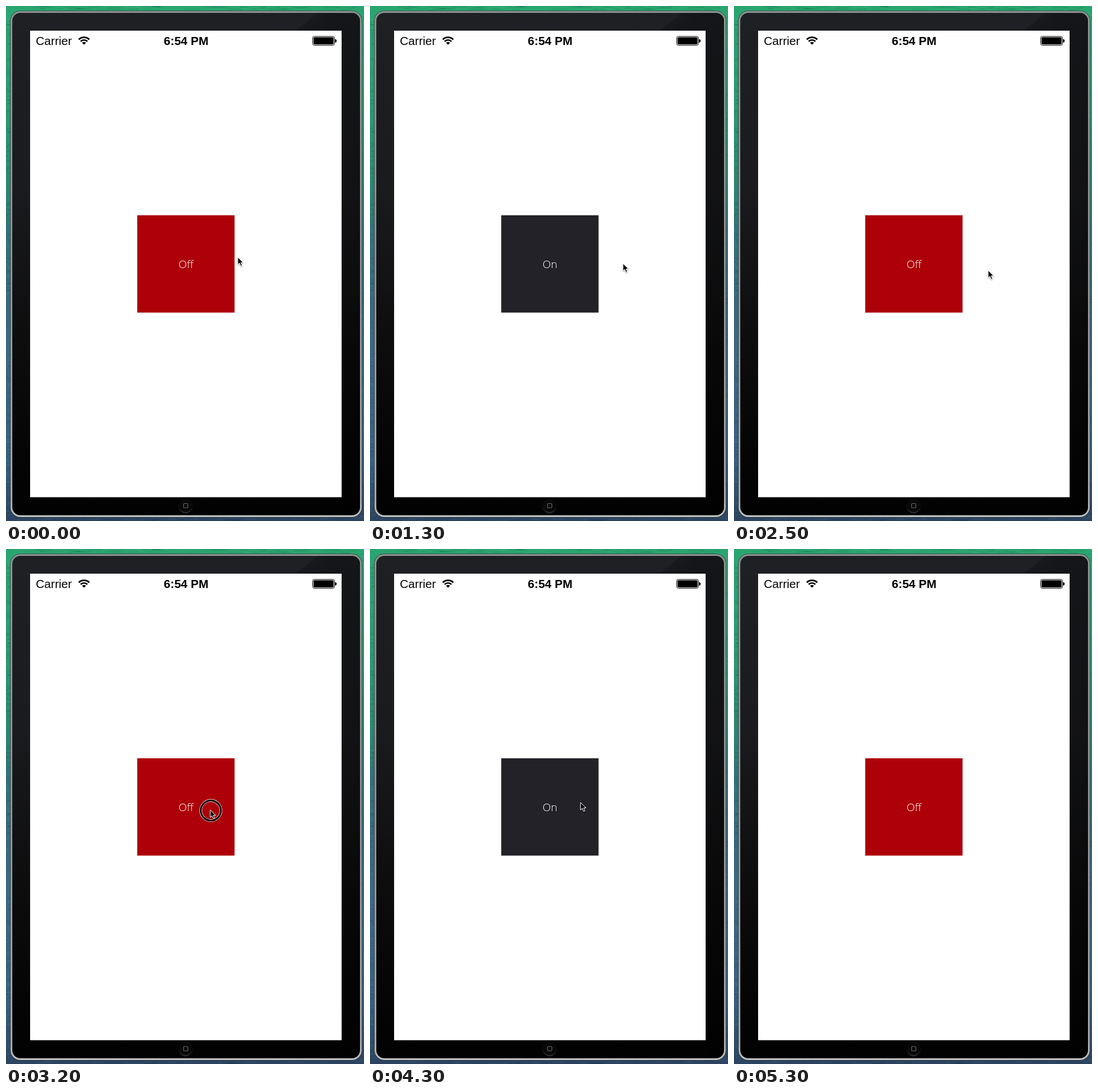
An HTML page with a canvas that plays this animation: 624x898 px, repeating every 6000 ms.

```html
<!DOCTYPE html>
<html lang="en">
<head>
<meta charset="utf-8">
<title>Toggle button</title>
<style>
  html, body { margin: 0; width: 100%; height: 100%; overflow: hidden; background: #28966f; }
  canvas, svg { position: absolute; left: 0; top: 0; width: 624px; height: 898px; display: block; }
  .status { font: 20.6px "Liberation Sans", Arial, sans-serif; }
  .clock { font-weight: 700; text-anchor: middle; }
  .label { font: 300 19px "Open Sans", "Liberation Sans", sans-serif; fill: #fff; text-anchor: middle; }
</style>
</head>
<body>
<canvas id="wall" width="624" height="898"></canvas>
<svg viewBox="0 0 624 898">
  <defs>
    <linearGradient id="rim" x1="0" y1="0" x2="0" y2="1">
      <stop offset="0" stop-color="#8f9292"/>
      <stop offset=".5" stop-color="#8f8f8f"/>
      <stop offset=".97" stop-color="#a8a8a8"/>
      <stop offset="1" stop-color="#c4c4c4"/>
    </linearGradient>
    <linearGradient id="body" x1="0" y1="0" x2="0" y2="1">
      <stop offset="0" stop-color="#1e2024"/>
      <stop offset=".35" stop-color="#1a1b1e"/>
      <stop offset=".65" stop-color="#0d0d0e"/>
      <stop offset=".9" stop-color="#040404"/>
      <stop offset="1" stop-color="#020202"/>
    </linearGradient>
    <linearGradient id="shade" x1="500" y1="0" x2="560" y2="40" gradientUnits="userSpaceOnUse">
      <stop offset="0" stop-color="#000" stop-opacity=".08"/>
      <stop offset="1" stop-color="#000" stop-opacity=".32"/>
    </linearGradient>
    <linearGradient id="home" x1="0" y1="0" x2="0" y2="1">
      <stop offset="0" stop-color="#050505"/>
      <stop offset=".6" stop-color="#0e0e0e"/>
      <stop offset="1" stop-color="#333"/>
    </linearGradient>
    <filter id="drop" x="-50%" y="-50%" width="200%" height="200%">
      <feDropShadow dx="0" dy="1.2" stdDeviation="1.1" flood-opacity=".45"/>
    </filter>
  </defs>

  <!-- device -->
  <rect x="7" y="8" width="614" height="884" rx="18" fill="#30383a" fill-opacity=".7"/>
  <rect x="8" y="9" width="612" height="882" rx="17" fill="url(#rim)"/>
  <rect x="11" y="12" width="606" height="876" rx="14" fill="url(#body)"/>
  <path d="M543 12H603a14 14 0 0 1 14 14V874a14 14 0 0 1-14 14H585V43H505Z" fill="url(#shade)"/>
  <circle cx="313" cy="872" r="12.5" fill="url(#home)"/>
  <circle cx="313" cy="870.5" r="11.8" fill="#080808"/>
  <rect x="309.5" y="867.5" width="7.5" height="7.5" rx="1.6" fill="none" stroke="#6a6a6a" stroke-width="1.2"/>
  <rect x="42" y="43" width="543" height="813.5" fill="#fff"/>

  <!-- status bar -->
  <text class="status" x="52" y="68">Carrier</text>
  <g transform="translate(136 67.5)" fill="none" stroke="#000" stroke-width="2.7">
    <path d="M-9.1-9A12.8 12.8 0 0 1 9.1-9"/>
    <path d="M-5.9-5.8A8.3 8.3 0 0 1 5.9-5.8"/>
    <path d="M0 0L-3.4-3.4A4.8 4.8 0 0 1 3.4-3.4Z" fill="#000" stroke="none"/>
  </g>
  <text class="status clock" x="314" y="68">6:54 PM</text>
  <rect x="534.5" y="53" width="38" height="15.5" rx="3" fill="none" stroke="#000"/>
  <rect x="536" y="54.5" width="35" height="12.5" rx="1.8"/>
  <path d="M574 58a3 3 0 0 1 0 5.6Z" stroke="#000"/>

  <!-- button -->
  <rect id="button" x="228.7" y="364.9" width="169.7" height="169.7"/>
  <text id="label" class="label" x="313.6" y="457"></text>

  <!-- pointer -->
  <g id="pointer">
    <g id="ring" fill="none" transform="translate(1 1)">
      <circle r="17.5" stroke="#fff" stroke-opacity=".8" stroke-width="4.8"/>
      <circle r="17.5" stroke="#000" stroke-width="3"/>
    </g>
    <path d="M0 0V13L3 10.2 5.3 15.4 7.6 14.4 5.4 9.4H9.4Z" stroke="#fff" stroke-width="1" filter="url(#drop)"/>
  </g>
</svg>
<script>
const LOOP = 6000, STEP = 100;
const $ = id => document.getElementById(id);

// time, x, y of the pointer tip
const path = [
  [0, 404, 438], [500, 357, 444], [800, 357, 444],
  [1300, 441, 449], [1400, 441, 449], [2000, 357, 452], [2200, 357, 452],
  [2500, 443, 461], [2800, 446, 462], [3100, 356, 455], [3300, 356, 455],
  [3700, 452, 450], [3900, 452, 450], [4300, 367, 442], [4600, 367, 442],
  [5300, 600, -30]
];
const presses = [[600, 800], [2000, 2200], [3100, 3300], [4400, 4500]];
const lerp = (a, b, k) => a + (b - a) * k;

function tipAt(t) {
  const i = path.findIndex(p => p[0] > t);
  if (i < 0) return null;
  const [t0, x0, y0] = path[i - 1], [t1, x1, y1] = path[i];
  const u = (t - t0) / (t1 - t0), k = u * u * (3 - 2 * u);
  return [lerp(x0, x1, k), lerp(y0, y1, k)];
}

function drawWall() {
  const g = $('wall').getContext('2d');
  const sky = g.createLinearGradient(0, 0, 0, 898);
  [[0, '#29a56f'], [.22, '#28996f'], [.34, '#2a8872'], [.44, '#30747a'], [.55, '#356a7e'],
   [.7, '#396788'], [.88, '#365f85'], [1, '#2b4360']].forEach(s => sky.addColorStop(...s));
  g.fillStyle = sky;
  g.fillRect(0, 0, 624, 898);
  let seed = 7;
  const rnd = () => (seed = seed * 16807 % 2147483647) / 2147483647;
  const streak = (x, y, w) => {
    g.strokeStyle = rnd() < .55 ? 'rgba(0,30,40,.12)' : 'rgba(150,230,210,.07)';
    g.lineWidth = .6 + rnd();
    g.beginPath();
    g.moveTo(x, y);
    g.lineTo(x + w, y + (rnd() - .5) * 3);
    g.stroke();
  };
  for (let i = 0; i < 330; i++) streak(rnd() * 6 - 3, rnd() * 898, 3 + rnd() * 7);
  for (let i = 0; i < 120; i++) streak(617 + rnd() * 4, rnd() * 898, 5);
  for (let i = 0; i < 90; i++) streak(rnd() * 624, rnd() * 8, 8 + rnd() * 20);
  for (let i = 0; i < 60; i++) streak(rnd() * 624, 892 + rnd() * 6, 8 + rnd() * 20);
}

function render(t) {
  const on = presses.filter(p => t >= p[1]).length % 2 === 1;
  $('button').setAttribute('fill', on ? '#232228' : '#ad0009');
  $('label').textContent = on ? 'On' : 'Off';
  const tip = tipAt(t);
  $('pointer').style.display = tip ? '' : 'none';
  if (tip) $('pointer').setAttribute('transform', `translate(${tip})`);
  const pressed = presses.some(([a, b]) => t >= a && t < b);
  $('ring').style.display = pressed ? '' : 'none';
}

drawWall();
const start = performance.now();
function tick() {
  const t = (performance.now() - start) % LOOP;
  render(Math.floor(t / STEP) * STEP);
  requestAnimationFrame(tick);
}
tick();
</script>
</body>
</html>
```
